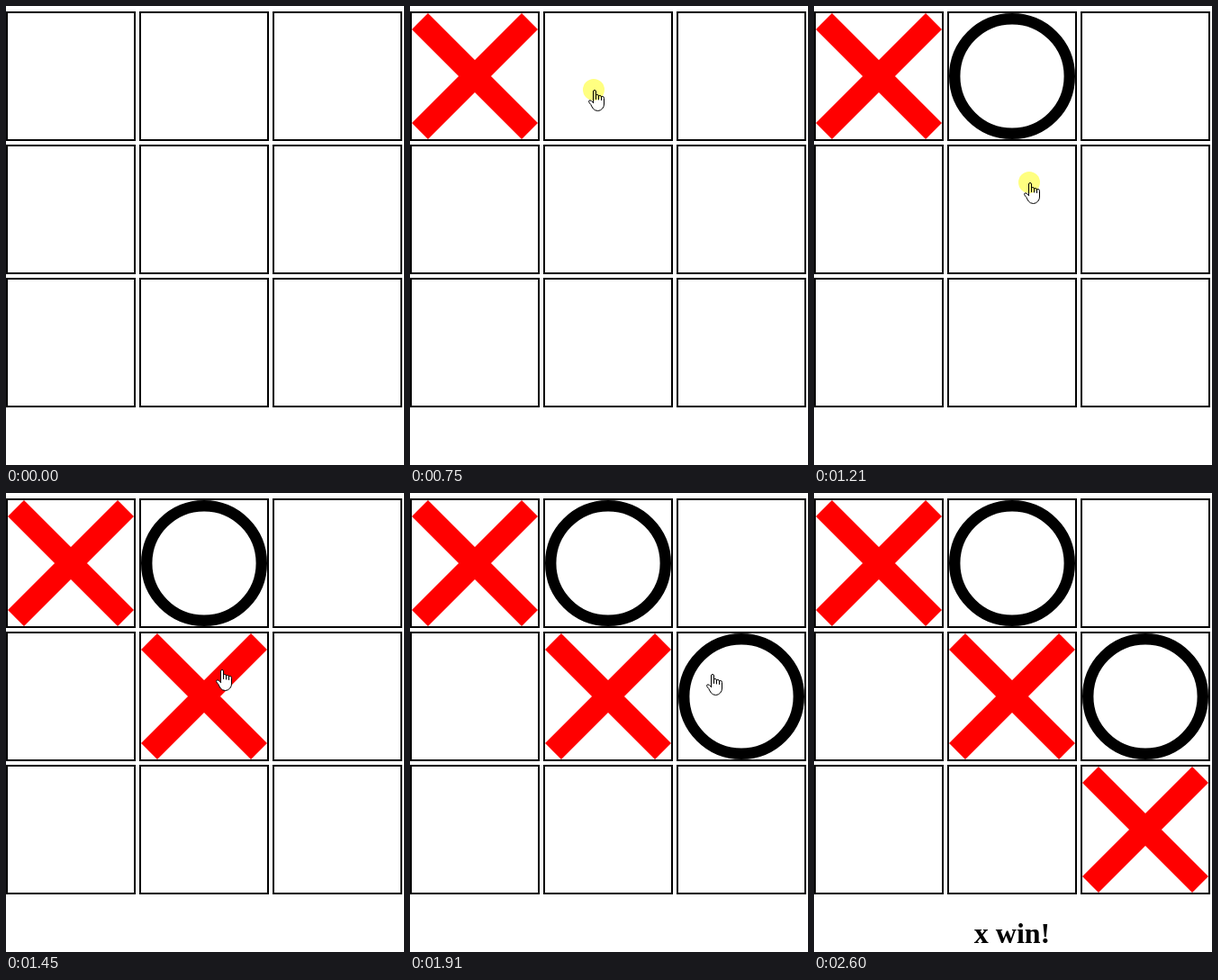
These frames come from a looping animation (442 px wide and 510 px high, 2.84 s). An HTML page:

```html
<!DOCTYPE html>
<html lang="en">
<head>
<meta charset="utf-8">
<title>Tic-tac-toe</title>
<style>
  html, body { margin: 0; width: 100%; height: 100%; overflow: hidden; background: #fff; }
  svg { display: block; }
  .cell { fill: none; stroke: #000; stroke-width: 2; }
  .x { fill: none; stroke: #f00; stroke-width: 25.4; }
  .o { fill: none; stroke: #000; stroke-width: 12.4; }
  #glow { fill: #ffff80; mix-blend-mode: multiply; }
  #hand path { fill: #fff; stroke: #000; stroke-linejoin: round; stroke-linecap: round; }
  text { font: bold 32px "Liberation Serif", "Times New Roman", serif; text-anchor: middle; }
</style>
</head>
<body>
<svg width="442" height="510" viewBox="0 0 442 510">
  <rect width="442" height="510" fill="#fff"/>
  <g id="board"></g>
  <g id="hand">
    <path d="M5.5 14.5V2Q5.5 .5 7 .5T8.5 2V6.5Q9 5.5 10 5.5Q11.5 5.5 11.5 7.2Q12 6.5 13 6.5Q14.5 6.5 14.5 8.2Q15 7.5 16 7.5Q17.5 7.7 17.5 9.5V16Q17.5 19 15.7 21Q13.5 23.5 10.5 23.5Q7 23.3 5.3 21L3.5 18Q3.2 16.5 1.5 15L.6 13.5Q.3 12 2 11.8Q3.4 11.9 5.5 14.5Z"/>
    <path d="M8.5 6.5V10.5M11.5 7.2V11M14.5 8.2V11.5"/>
  </g>
  <circle id="glow" r="12"/>
  <text id="result" x="220" y="500">x win!</text>
</svg>
<script>
const LOOP = 2840;
const $ = id => document.getElementById(id);
const board = $('board'), hand = $('hand'), glow = $('glow'), result = $('result');

// [start, x, y] of the pointer, in ms and px
const stops = [
  [120, 67, 76], [750, 198, 93], [1210, 233, 196],
  [1680, 329, 202], [1760, 329, 201], [2140, 347, 356]
];
const pointerEnd = 2600;
const presses = [[290, 450], [750, 980], [1210, 1450], [1680, 1910], [2140, 2290]];
// [start, kind, column, row]
const moves = [[530, 'x', 0, 0], [980, 'o', 1, 0], [1450, 'x', 1, 1], [1910, 'o', 2, 1], [2370, 'x', 2, 2]];
const winTime = 2370;

function add(tag, attrs) {
  const el = document.createElementNS('http://www.w3.org/2000/svg', tag);
  for (const name in attrs) el.setAttribute(name, attrs[name]);
  return board.appendChild(el);
}

function addMark(kind, col, row) {
  const x = 2 + col * 148, y = 8 + row * 148;
  return kind === 'x'
    ? add('path', { class: 'x', d: `M${x + 9} ${y + 9}l122 122m0 -122l-122 122` })
    : add('circle', { class: 'o', cx: x + 70, cy: y + 70, r: 63.8 });
}

for (let i = 0; i < 9; i++) {
  add('rect', { class: 'cell', x: 1 + i % 3 * 148, y: 7 + Math.floor(i / 3) * 148, width: 142, height: 142 });
}
const marks = moves.map(([start, ...place]) => ({ start, el: addMark(...place) }));

const show = (el, on) => { el.style.display = on ? '' : 'none'; };

function draw(t) {
  const stop = stops.filter(s => s[0] <= t).pop();
  show(hand, stop && t < pointerEnd);
  show(glow, presses.some(([from, to]) => t >= from && t < to));
  if (stop) {
    const [, x, y] = stop;
    hand.setAttribute('transform', `translate(${x} ${y})`);
    glow.setAttribute('transform', `translate(${x + 6} ${y})`);
  }
  for (const { start, el } of marks) show(el, t >= start);
  show(result, t >= winTime);
}

const begin = performance.now();
function tick() {
  draw((performance.now() - begin) % LOOP);
  requestAnimationFrame(tick);
}
tick();
</script>
</body>
</html>
```
